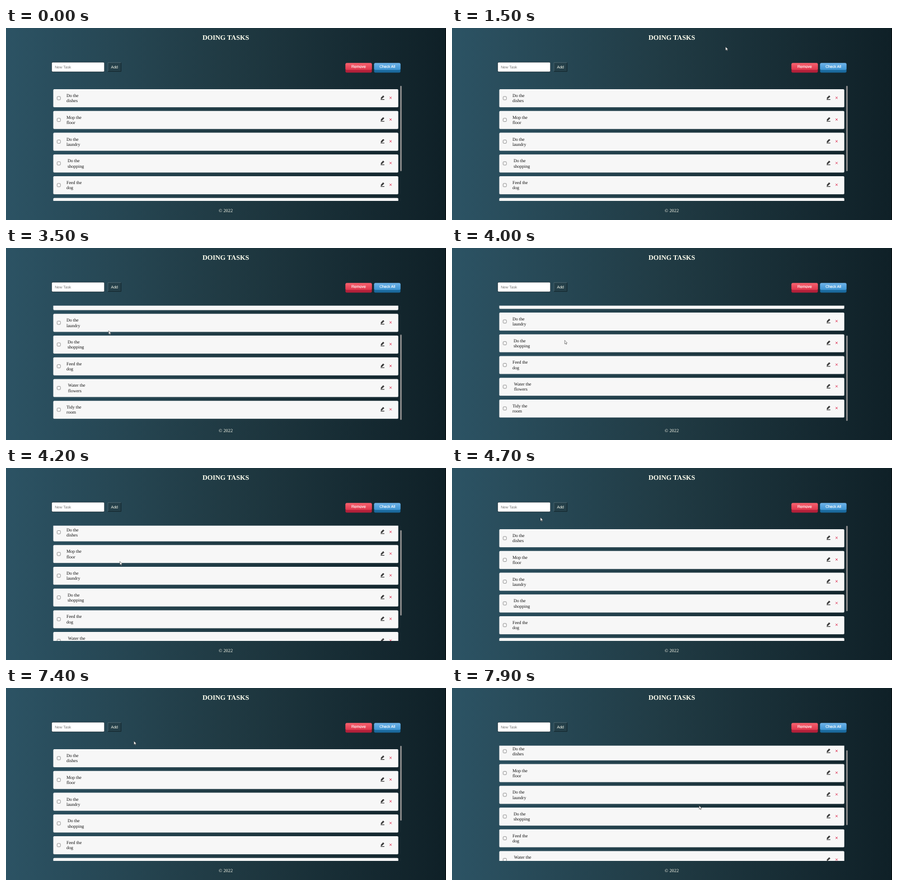
Recreate the animation shown at these times as an HTML page. Size 786 by 342 pixels, loop 8000 ms.

```html
<!DOCTYPE html>
<html lang="en">
<head>
<meta charset="utf-8">
<title>Doing Tasks</title>
<style>
  html, body { margin: 0; width: 100%; height: 100%; overflow: hidden; background: #203a43; }
  svg { display: block; width: 786px; height: 342px; }
  text { text-rendering: geometricPrecision; }
  .serif { font-family: "Liberation Serif", serif; }
  .sans { font-family: "Liberation Sans", sans-serif; }
  .light { fill: #fffff0; text-anchor: middle; }
  .glossy { fill: #fff; stroke: #fff; stroke-width: .15; text-anchor: middle; }
</style>
</head>
<body>
<svg viewBox="0 0 786 342">
  <defs>
    <linearGradient id="page">
      <stop offset="0" stop-color="#2c5364"/>
      <stop offset=".5" stop-color="#203a43"/>
      <stop offset="1" stop-color="#0f2027"/>
    </linearGradient>
    <linearGradient id="red" x2="0" y2="1">
      <stop offset="0" stop-color="#f9626f"/>
      <stop offset="1" stop-color="#dd374c"/>
    </linearGradient>
    <linearGradient id="blue" x2="0" y2="1">
      <stop offset="0" stop-color="#6fb4ea"/>
      <stop offset="1" stop-color="#3d94d1"/>
    </linearGradient>
    <clipPath id="view"><rect x="80" y="102.7" width="622" height="205.3"/></clipPath>
    <g id="card">
      <rect x="84.2" y=".3" width="616.8" height="32.1" rx="2" fill="#8d9a9f" opacity=".7"/>
      <rect x="84.6" width="616" height="31.9" rx="1.6" fill="#f7f7f7"/>
      <rect x="91.4" y="13" width="5.8" height="5.8" rx="1.1" fill="#fff" stroke="#767676" stroke-width=".8"/>
      <g fill="#555" stroke="#111" stroke-linejoin="round">
        <path d="M670 16.9l.4-1.9 3.4-3.4 1.4 1.4-3.4 3.4z"/>
        <path d="M669.3 18.4h6.6"/>
      </g>
      <path d="M685.2 13.4l3.7 3.7m0-3.7l-3.7 3.7" stroke="#dc2448" stroke-width=".9"/>
    </g>
  </defs>

  <rect width="786" height="342" fill="url(#page)"/>
  <rect x="785" width="1" height="342" fill="#050a0c"/>
  <text class="serif light" x="392.6" y="21.2" font-size="12.2" font-weight="bold">DOING TASKS</text>
  <text class="serif light" x="392.6" y="327.6" font-size="8.3">© 2022</text>

  <g id="focus">
    <rect x="79.9" y="59.4" width="97.4" height="20.2" rx="2.6" fill="#101010"/>
    <rect x="80.5" y="60" width="96.2" height="19" rx="2.2" fill="#fff"/>
  </g>
  <rect x="81.6" y="61" width="94.2" height="17.1" rx="1.8" fill="#fff" stroke="#16252b" stroke-width=".7"/>
  <text id="entry" class="sans" x="87.2" y="71.8" font-size="6.72"></text>
  <path id="caret" d="M87.5 65.6v7.6" stroke="#000" stroke-width=".8"/>

  <g id="add">
    <rect x="182" y="61.6" width="23.6" height="15.8" rx="1.5" fill="#243f49"/>
    <path d="M182 77.4V61.6h23.6" fill="none" stroke="#4d6770" stroke-width=".9"/>
    <path d="M182 77.4h23.6V61.6" fill="none" stroke="#14262d"/>
    <text class="sans light" x="193.8" y="71.9" font-size="7">Add</text>
  </g>

  <rect x="606.4" y="63" width="47.2" height="16.6" rx="2.4" fill="#b3203a"/>
  <rect x="606.4" y="62.2" width="47.2" height="12.6" rx="2.4" fill="url(#red)"/>
  <text class="sans glossy" x="630" y="70.5" font-size="6.95">Remove</text>
  <rect x="657.5" y="63" width="47.2" height="16.6" rx="2.4" fill="#1b6a9e"/>
  <rect x="657.5" y="62.2" width="47.2" height="12.6" rx="2.4" fill="url(#blue)"/>
  <text class="sans glossy" x="681.2" y="70.5" font-size="6.75">Check All</text>

  <g clip-path="url(#view)"><g id="list"></g></g>
  <rect id="thumb" x="704.1" width="2.8" rx="1.3" fill="#8b8b8b"/>
  <path id="arrow" d="M0 0v6.4l1.5-1.3 1 2.2 1-.5-1-2.1h2z" fill="#fff" stroke="#333" stroke-width=".55"/>
  <path id="beam" d="M-1.3-3.4h2.6M0-3.4v6.8M-1.3 3.4h2.6" stroke="#333" stroke-width=".7"/>
</svg>
<script>
const LOOP = 8000, STEP = 100;
const VIEW_TOP = 103, VIEW_HEIGHT = 205, FIRST_CARD = 109.1, PITCH = 38.72;
const NEW_TASK = "Take out the garbage";
const TASKS = [
  "Do the/dishes", "Mop the/floor", "Do the/laundry", "Do the/shopping",
  "Feed the/dog", "Water the/flowers", "Tidy the/room", "Take out/the garbage"
];
const INDENT = { "Do the/shopping": 2, "Water the/flowers": 2.8 };

const $ = id => document.getElementById(id);
const show = (id, on) => $(id).setAttribute("visibility", on ? "visible" : "hidden");
const move = (id, x, y) => $(id).setAttribute("transform", `translate(${x} ${y})`);
const progress = (t, start, end) => Math.min(1, Math.max(0, (t - start) / (end - start)));
const smooth = k => k * k * (3 - 2 * k);
const cubic = k => k < .5 ? 4 * k ** 3 : 1 - 4 * (1 - k) ** 3;

// The pointer glides from rest to rest.
const ENTRANCES = [{ at: 1300, x: 545, y: 15 }, { at: 2300, x: 213, y: 7 }];
const GLIDES = [
  { start: 1300, end: 1600, x: 469, y: 40 },
  { start: 1800, end: 2000, x: 432, y: 25 },
  { start: 2300, end: 2700, x: 155, y: 112 },
  { start: 2800, end: 3000, x: 183.3, y: 147.5 },
  { start: 3600, end: 4100, x: 203.4, y: 166.4 },
  { start: 4400, end: 4700, x: 158, y: 88 },
  { start: 4800, end: 5000, x: 146, y: 70 },
  { start: 5800, end: 6200, x: 189, y: 73.2 },
  { start: 7300, end: 7700, x: 441.5, y: 209.5 }
];

function pointerAt(t) {
  const entrance = ENTRANCES.findLast(e => e.at <= t);
  if (!entrance || (t >= 2100 && t < 2300)) return null;
  let { x, y } = entrance;
  for (const glide of GLIDES.filter(g => g.start >= entrance.at)) {
    const k = smooth(progress(t, glide.start, glide.end));
    x += (glide.x - x) * k;
    y += (glide.y - y) * k;
  }
  return { x, y };
}

function scrollAt(t, maxScroll) {
  if (t >= 7700) return maxScroll * cubic(progress(t, 7700, 8360));
  return maxScroll * (cubic(progress(t, 3100, 3600)) - cubic(progress(t, 4000, 4300)));
}

function drawPointer(t) {
  const pointer = pointerAt(t);
  const { x, y } = pointer ?? { x: -20, y: -20 };
  const inRow = y > 61 && y < 78;
  const inField = inRow && x > 82 && x < 175;
  const onAdd = inRow && x > 182 && x < 206;
  show("arrow", pointer && !inField);
  show("beam", pointer && inField);
  move("arrow", x, y);
  move("beam", x, y);
  $("add").setAttribute("transform",
    onAdd ? "translate(193.8 69.5) scale(1.07) translate(-193.8 -69.5)" : "");
}

function drawField(t, added) {
  const focused = t >= 4900 && !added;
  const typed = t < 5500 || added ? 0 : 1 + Math.round((NEW_TASK.length - 1) * progress(t, 5700, 6100));
  const entry = $("entry");
  entry.textContent = typed ? NEW_TASK.slice(0, typed) : "New Task";
  entry.setAttribute("fill", typed ? "#111" : "#757575");
  show("focus", focused);
  show("caret", focused);
  move("caret", typed && entry.getComputedTextLength(), 0);
}

function drawList(t, added) {
  const content = 5.5 + PITCH * (added ? TASKS.length : TASKS.length - 1);
  const ratio = VIEW_HEIGHT / content;
  const scroll = scrollAt(t, content - VIEW_HEIGHT);
  move("list", 0, -scroll);
  $("list").lastElementChild.setAttribute("visibility", added ? "visible" : "hidden");
  $("thumb").setAttribute("y", VIEW_TOP + scroll * ratio);
  $("thumb").setAttribute("height", VIEW_HEIGHT * ratio);
}

function tick() {
  const t = Math.floor(performance.now() % LOOP / STEP) * STEP;
  const added = t >= 6900;
  drawList(t, added);
  drawField(t, added);
  drawPointer(t);
  requestAnimationFrame(tick);
}

$("list").innerHTML = TASKS.map((task, i) => {
  const x = 108 + (INDENT[task] ?? 0);
  const lines = task.split("/").map((line, row) => `<tspan x="${x}" y="${14 + row * 9.3}">${line}</tspan>`);
  return `<g transform="translate(0 ${FIRST_CARD + i * PITCH})">
    <use href="#card"/><text class="serif" font-size="8" fill="#111">${lines.join("")}</text></g>`;
}).join("");
tick();
</script>
</body>
</html>
```
